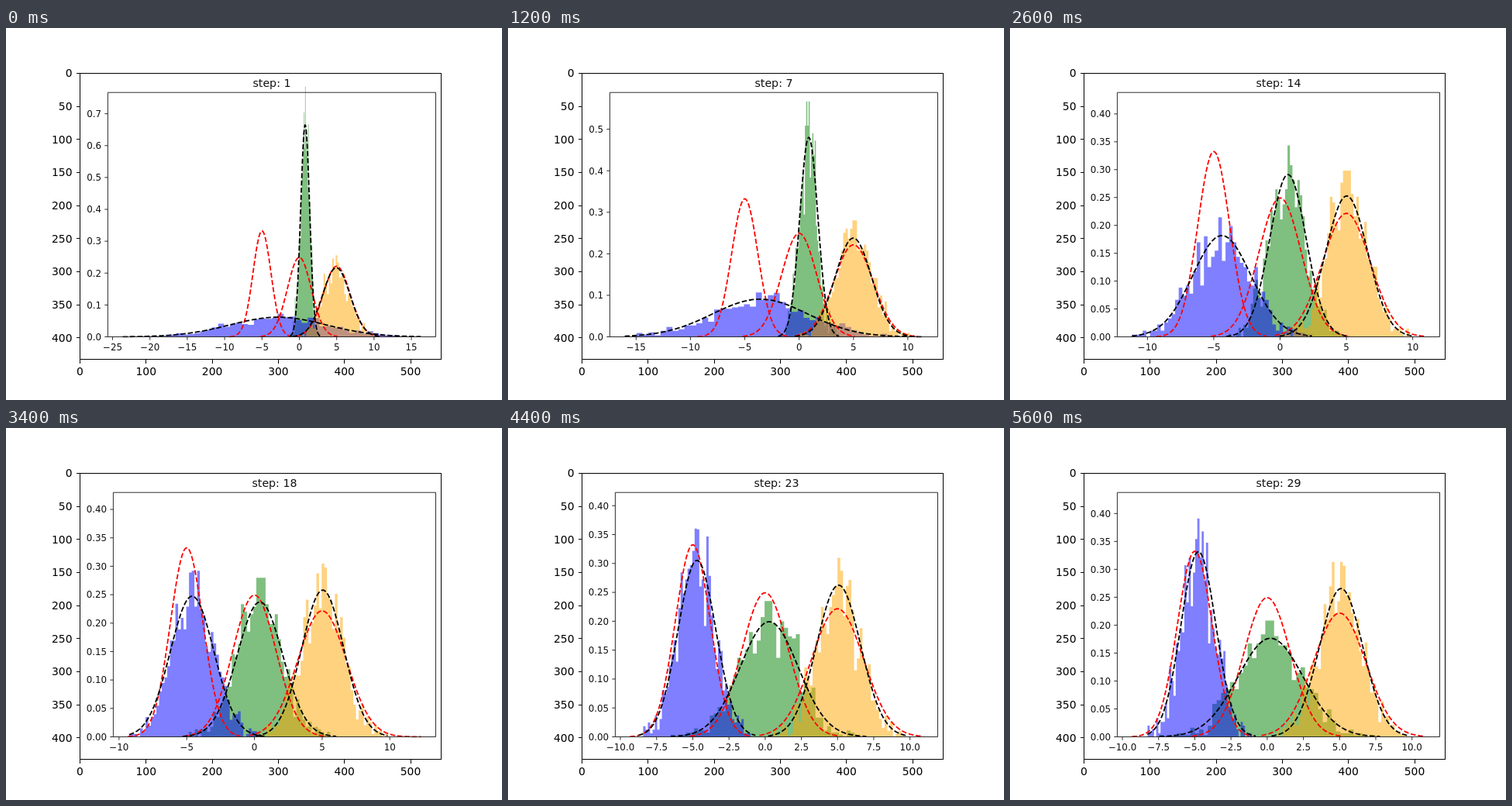
Animation, 640 px wide and 480 px high, one loop 5.8 s. Source, as an HTML page:

```html
<!DOCTYPE html>
<html lang="en">
<head>
<meta charset="utf-8">
<title>Distribution fitting</title>
<style>
  html, body { margin: 0; width: 100%; height: 100%; overflow: hidden; background: #fff; }
  svg { display: block; width: 640px; height: 480px; font-family: "DejaVu Sans", sans-serif; }
  .mid { text-anchor: middle; }
  .end { text-anchor: end; }
  #outer { font-size: 13.89px; }
  #outer path { fill: none; stroke: #000; shape-rendering: crispEdges; }
  #plot { font-size: 11.85px; fill: #111; }
  #plot .title { font-size: 14.2px; }
  .axes { fill: none; stroke: #222; stroke-width: .95; }
  .curve { fill: none; stroke-width: 1.8; stroke-dasharray: 6.5 2.85; stroke-linejoin: round; }
</style>
</head>
<body>
<svg viewBox="0 0 640 480">
  <g id="outer"></g>
  <g id="plot"></g>
</svg>
<script>
const STEPS = 29, STEP_MS = 200;
const TOP = 83.2, BASE = 398.5, RIGHT = 554.5;
const BINS = 50, SAMPLES = 1000;
const COLORS = ['#00f', '#008000', '#ffa500'];

const px = v => v.toFixed(2);
const signed = (v, digits) => v.toFixed(digits).replace('-', '\u2212');
const label = (x, y, cls, text) =>
  `<text x="${px(x)}" y="${px(y)}" class="${cls}">${text}</text>`;

// Falls from 1 to 0; a higher power keeps it flat longer at the start.
const fade = (t, scale, power) => Math.exp(-((t / scale) ** power));

// A normal curve drawn from `down` to `up` standard deviations around its mean.
const bell = (mean, sigma, down, up) => ({
  low: mean - down * sigma,
  high: mean + up * sigma,
  mean,
  peak: 1 / (sigma * Math.sqrt(2 * Math.PI)),
  at(x) { return this.peak * Math.exp(-(((x - mean) / sigma) ** 2) / 2); }
});

function fitsAt(t) {
  const settle = fade(t, 9.4, 1.55);
  const wobble = .21 * fade(t, 30, 1) * Math.cos(.55 * t);
  return [
    bell(-4.76 + 1.92 * settle, 1.18 + 5.3 * settle, 3 + wobble, 3.2 - 1.2 * wobble),
    bell(.22 + (.56 + .05 * t) * fade(t, 12, 2), 2.5 - 1.9 * fade(t, 18.7, 1.8), 3.4, 3.35),
    bell(4.95 + .0055 * t, 1.48 + .36 * fade(t, 10, 1), 3.2, 3.1)
  ];
}

function targetsAt(t) {
  // Stray samples stretch the last tail for a moment.
  const stray = .78 * fade(Math.abs(t - 17), 2, 2);
  return [
    bell(-5, 1.2, 3.62, 3.3),
    bell(0, 1.6, 3.25, 3.2),
    bell(5, 1.8, 3, 3.28 + stray)
  ];
}

const yLimit = t => .43 + .333 * fade(t, 6.8, 2.9) + .008 * Math.cos(.4 * (t - 13));

// The smallest tick size that leaves at most nine intervals.
const tickSize = (span, sizes) => sizes.find(s => span / s <= 9);

function random(seed) {
  let s = seed * 7919 + 17;
  return () => {
    s = (s + 0x6D2B79F5) | 0;
    let r = Math.imul(s ^ (s >>> 15), 1 | s);
    r = (r + Math.imul(r ^ (r >>> 7), 61 | r)) ^ r;
    return ((r ^ (r >>> 14)) >>> 0) / 4294967296;
  };
}

function histogram(fit, seed, X, Y) {
  const next = random(seed);
  const width = (fit.high - fit.low) / BINS, unit = 1 / (width * SAMPLES);
  const mode = Math.floor((fit.mean - fit.low) / width);
  const tallest = 1.18 * fit.peak;
  let d = `M${px(X(fit.low))} ${BASE}`;
  for (let i = 0; i < BINS; i++) {
    const x = fit.low + i * width;
    const expected = fit.at(x + width / 2) / unit;
    const noise = (next() + next() + next() - 1.5) * 2;
    const count = Math.max(0, Math.round(expected + noise * Math.sqrt(expected)));
    const height = i === mode ? tallest : Math.min(tallest, count * unit);
    d += `V${px(Y(height))}H${px(X(x + width))}`;
  }
  return d + `V${BASE}Z`;
}

function curve(b, color, X, Y) {
  const points = Array.from({ length: 101 }, (_, i) => {
    const x = b.low + (b.high - b.low) * i / 100;
    return px(X(x)) + ' ' + px(Y(b.at(x)));
  });
  return `<path class="curve" stroke="${color}" d="M${points.join('L')}"/>`;
}

function drawPlot(step) {
  const t = step - 1;
  const fits = fitsAt(t), targets = targetsAt(t), all = [...fits, ...targets];
  const yMax = yLimit(t);
  const ySize = tickSize(yMax, [.05, .1, .2]);
  const yDigits = ySize < .1 ? 2 : 1;
  const left = yDigits === 2 ? 138.4 : 131.4;

  const low = Math.min(...all.map(b => b.low));
  const high = Math.max(...all.map(b => b.high));
  const pad = (high - low) * .05;
  const xMin = low - pad, xMax = high + pad;
  const X = v => left + (v - xMin) / (xMax - xMin) * (RIGHT - left);
  const Y = v => BASE - v / yMax * (BASE - TOP);

  let out = '';
  for (const i of [1, 0, 2]) {
    const d = histogram(fits[i], step * 3 + i, X, Y);
    out += `<path fill="${COLORS[i]}" fill-opacity=".5" d="${d}"/>`;
  }
  targets.forEach(b => out += curve(b, '#f00', X, Y));
  fits.forEach(b => out += curve(b, '#000', X, Y));

  let axes = `M${left} ${TOP}H${RIGHT}V${BASE}H${left}Z`;
  const xSize = tickSize(xMax - xMin, [2.5, 5, 10]);
  for (let n = Math.ceil(xMin / xSize); n * xSize <= xMax; n++) {
    const x = X(n * xSize);
    axes += `M${px(x)} ${BASE}v4.1`;
    out += label(x, 416, 'mid', signed(n * xSize, xSize < 5 ? 1 : 0));
  }
  for (let n = 0; n * ySize <= yMax; n++) {
    const y = Y(n * ySize);
    axes += `M${left} ${px(y)}h-4.1`;
    out += label(left - 8.3, y + 4.3, 'end', (n * ySize).toFixed(yDigits));
  }
  out += `<path class="axes" d="${axes}"/>`;
  return out + label((left + RIGHT) / 2, 76, 'mid title', 'step: ' + step);
}

function drawOuter() {
  const scale = .8533;
  let d = 'M95.5 58.5H561.5V427.5H95.5Z', out = '';
  for (let v = 0; v <= 500; v += 100) {
    const x = 95.4 + v * scale;
    d += `M${Math.floor(x) + .5} 427.5v5`;
    out += label(x, 447.5, 'mid', v);
  }
  for (let v = 0; v <= 400; v += 50) {
    const y = 58.4 + v * scale;
    d += `M95.5 ${Math.floor(y) + .5}h-5`;
    out += label(85.5, Math.round(y + 4.9), 'end', v);
  }
  return `<path d="${d}"/>` + out;
}

document.getElementById('outer').innerHTML = drawOuter();
const plot = document.getElementById('plot');
const start = performance.now();
let shown = 0;

function tick() {
  const elapsed = Math.max(0, performance.now() - start);
  const step = Math.floor(elapsed / STEP_MS) % STEPS + 1;
  if (step !== shown) {
    plot.innerHTML = drawPlot(step);
    shown = step;
  }
  requestAnimationFrame(tick);
}
tick();
</script>
</body>
</html>
```
